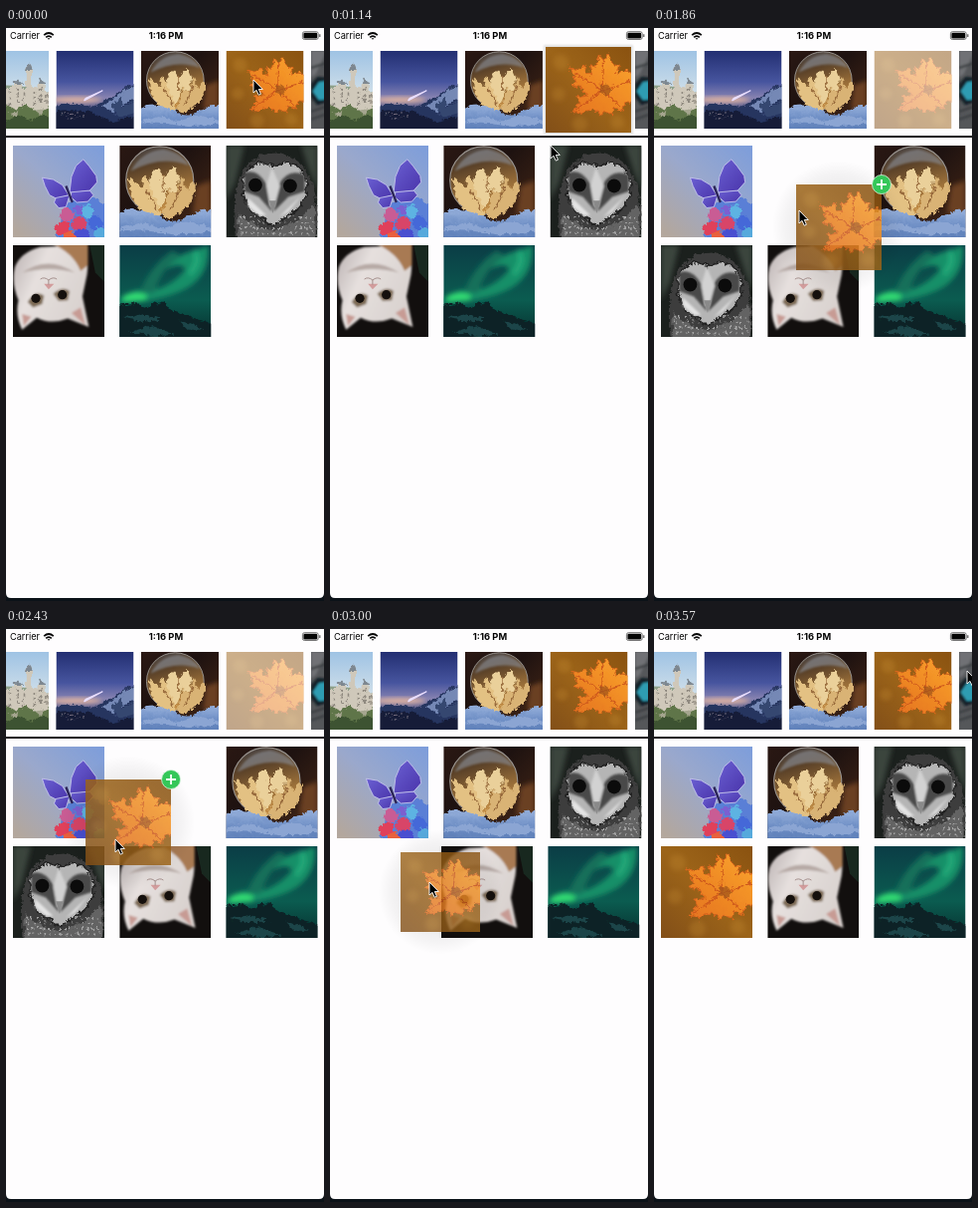
Recreate the animation shown at these times as an HTML page. Size 320 by 575 pixels, loop 3710 ms.

```html
<!DOCTYPE html>
<html lang="en">
<head>
<meta charset="utf-8">
<title>Drag and drop between collections</title>
<style>
  html, body { margin: 0; width: 100%; height: 100%; overflow: hidden; background: #0b1218; }
  svg.stage { display: block; width: 320px; height: 575px; }
  text { font-family: Inter, "Liberation Sans", sans-serif; fill: #050505; }
</style>
</head>
<body>
<svg class="stage" viewBox="0 0 320 575">
  <defs>
    <linearGradient id="haze" x1="1" y1="0" x2=".1" y2="1">
      <stop offset="0" stop-color="#7d9ddb"/><stop offset=".5" stop-color="#9aa8cc"/><stop offset="1" stop-color="#b3a79d"/>
    </linearGradient>
    <linearGradient id="wing" x1="0" y1="0" x2="1" y2="1">
      <stop offset="0" stop-color="#6a5fd2"/><stop offset="1" stop-color="#4a35ab"/>
    </linearGradient>
    <linearGradient id="dusk" x2="1" y2="1">
      <stop offset="0" stop-color="#2a1813"/><stop offset=".4" stop-color="#1e1210"/><stop offset="1" stop-color="#4a2a18"/>
    </linearGradient>
    <linearGradient id="snow" x2="0" y2="1">
      <stop offset="0" stop-color="#93add9"/><stop offset=".4" stop-color="#7090c6"/><stop offset="1" stop-color="#5577b2"/>
    </linearGradient>
    <linearGradient id="glass" x2=".3" y2="1">
      <stop offset="0" stop-color="#4a4a50"/><stop offset=".35" stop-color="#5a4128"/><stop offset="1" stop-color="#c08a43"/>
    </linearGradient>
    <linearGradient id="autumn" x1="1" y1="0" x2="0" y2="1">
      <stop offset="0" stop-color="#8a5210"/><stop offset=".5" stop-color="#9c6419"/><stop offset="1" stop-color="#824f18"/>
    </linearGradient>
    <linearGradient id="maple" x1="1" y1="0" x2=".1" y2="1">
      <stop offset="0" stop-color="#fba72f"/><stop offset=".5" stop-color="#f08c25"/><stop offset="1" stop-color="#e57420"/>
    </linearGradient>
    <linearGradient id="fur" x2="1" y2=".5">
      <stop offset="0" stop-color="#b9b0b0"/><stop offset=".4" stop-color="#e6e0de"/><stop offset="1" stop-color="#d9d2cf"/>
    </linearGradient>
    <linearGradient id="polar" x2="0" y2="1">
      <stop offset="0" stop-color="#0b3d46"/><stop offset=".6" stop-color="#0b5c50"/><stop offset="1" stop-color="#07302f"/>
    </linearGradient>
    <linearGradient id="night" x2="0" y2="1">
      <stop offset="0" stop-color="#232f72"/><stop offset=".4" stop-color="#47559f"/><stop offset=".6" stop-color="#8581b0"/><stop offset="1" stop-color="#141c3a"/>
    </linearGradient>
    <linearGradient id="day" x2="0" y2="1">
      <stop offset="0" stop-color="#9fc3e4"/><stop offset=".6" stop-color="#d5e2ea"/>
    </linearGradient>
    <radialGradient id="shade">
      <stop offset=".5" stop-opacity=".08"/><stop offset=".8" stop-opacity=".04"/><stop offset="1" stop-opacity="0"/>
    </radialGradient>
    <filter id="soft" x="-30%" y="-30%" width="160%" height="160%"><feGaussianBlur stdDeviation="3"/></filter>
    <filter id="faint" x="-20%" y="-20%" width="140%" height="140%"><feGaussianBlur stdDeviation="1.2"/></filter>
    <filter id="rough" x="-10%" y="-10%" width="120%" height="120%">
      <feTurbulence baseFrequency=".12" numOctaves="2" seed="4"/>
      <feDisplacementMap in="SourceGraphic" scale="7" xChannelSelector="R" yChannelSelector="G"/>
    </filter>

    <symbol id="butterfly" viewBox="0 0 100 100">
      <rect width="100" height="100" fill="url(#haze)"/>
      <g filter="url(#rough)">
        <path d="M44 105L50 80 56 62 76 52 92 56 105 70V105Z" fill="#5a7fd6"/>
        <circle cx="57" cy="73" r="8" fill="#c95c94"/><circle cx="53" cy="88" r="8" fill="#e0405a"/>
        <circle cx="60" cy="97" r="7" fill="#e8603c"/><circle cx="70" cy="84" r="8" fill="#d84468"/>
        <circle cx="74" cy="96" r="8" fill="#4a50d0"/><circle cx="80" cy="70" r="7" fill="#5db3e2"/>
        <circle cx="88" cy="82" r="8" fill="#4468d8"/><circle cx="94" cy="95" r="8" fill="#57a9dc"/>
        <circle cx="70" cy="68" r="5" fill="#7b5fd0"/>
      </g>
      <g fill="url(#wing)" stroke="#c3c4ec" stroke-width="1">
        <path d="M61 54L54 43 44 37 32 35 35 44 40 54 48 58Z"/>
        <path d="M62 54L47 57 45 62 50 68 58 67Z"/>
        <path d="M64 50L84 49 88 54 82 61 70 62 63 56Z"/>
        <path d="M62 51L64 34 69 22 77 15 83 22 91 33 92 40 84 49Z"/>
      </g>
      <path d="M58 44L65 62" stroke="#2b2457" stroke-width="2.5"/>
    </symbol>

    <symbol id="bubble" viewBox="0 0 100 100">
      <rect width="100" height="100" fill="url(#dusk)"/>
      <path d="M84 44L100 38V74H80Z" fill="#6b3f20" filter="url(#soft)"/>
      <circle cx="44" cy="38" r="37" fill="url(#glass)" stroke="#99948f" stroke-width="1.2"/>
      <path d="M12 28Q24 6 48 4 70 8 76 22 46 10 12 28Z" fill="#8b9099" opacity=".6" filter="url(#faint)"/>
      <g filter="url(#rough)">
        <path d="M9 34L22 44 25 31 36 46 45 68 40 78Q10 70 9 34Z" fill="#e3c183"/>
        <path d="M45 74L52 48 60 53 66 32 72 46 81 38Q82 68 52 78Z" fill="#d9b374"/>
        <path d="M30 38L40 22 48 32 58 20 64 34 60 52 50 47 44 68Z" fill="#ead09a"/>
        <path d="M27 46L40 70M65 44L54 68M46 30L46 50" stroke="#96683a" stroke-width="2"/>
        <path d="M-5 72Q22 64 40 75T78 73Q92 66 106 71V108H-5Z" fill="url(#snow)"/>
        <path d="M-5 90L20 82 44 88 70 81 105 88V93L60 95 30 91Z" fill="#8ba5d3"/>
      </g>
    </symbol>

    <symbol id="leaf" viewBox="0 0 100 100">
      <rect width="100" height="100" fill="url(#autumn)"/>
      <g fill="#bd842f" opacity=".35" filter="url(#soft)">
        <circle cx="18" cy="18" r="9"/><circle cx="15" cy="55" r="8"/><circle cx="40" cy="90" r="9"/><circle cx="84" cy="88" r="8"/>
      </g>
      <g filter="url(#rough)">
        <path d="M26 22L36 25 43 20 48 28 53 31 50 20 57 21 61 8 66 14 71 6 76 18 84 20 82 30 92 26 103 30V64L92 62 88 72 78 68 76 78 66 74 62 78 54 70 46 72 40 79 36 74 28 74 38 64 34 57 46 55 42 47 30 43 34 36Z" fill="url(#maple)" stroke="#d8651d" stroke-width="1.2"/>
        <path d="M64 49L32 28M64 49L66 12M64 49L100 38M64 49L86 68M64 49L34 72" stroke="#cf5a1c" stroke-width="1.6"/>
        <path d="M62 45L70 41 75 48 69 55 61 52Z" fill="#9c521a" opacity=".7"/>
      </g>
    </symbol>

    <symbol id="owl" viewBox="0 0 100 100">
      <rect width="100" height="100" fill="#1b201d"/>
      <path d="M0 0H20L10 40 0 60ZM82 0H100V50L92 30Z" fill="#3a443c" filter="url(#soft)"/>
      <g filter="url(#rough)">
        <path d="M10 106Q4 62 12 36 24 6 54 6 86 10 94 46 102 74 94 106Z" fill="#3d3d3d"/>
        <path d="M12 72Q30 90 50 90T95 62L96 106H10Z" fill="#636363"/>
        <path d="M12 76H95M14 82H94M12 88H95M14 94H94" stroke="#a6a6a6" stroke-width="2" stroke-dasharray="2 4"/>
        <path d="M50 22Q34 10 21 26 10 50 26 70L49 85 70 72Q92 58 85 32 70 8 50 22Z" fill="#b5b5b5" stroke="#242424" stroke-width="2"/>
      </g>
      <g filter="url(#faint)">
        <path d="M20 30Q34 24 45 44L50 72 36 56 20 50ZM86 32Q68 24 58 42L52 72 68 56 86 50Z" fill="#4a4a4a"/>
        <path d="M50 24L44 44 48 66 53 66 59 44Z" fill="#d2d2d2"/>
        <path d="M24 57L44 76 36 76 24 66ZM82 55L58 78 68 72Z" fill="#e4e4e4"/>
      </g>
      <circle cx="32" cy="43" r="7.5" fill="#0b0b0b"/><circle cx="70" cy="44" r="7.5" fill="#0b0b0b"/>
      <path d="M47 60L55 60 51 74Z" fill="#8a8a8a"/>
    </symbol>

    <symbol id="cat" viewBox="0 0 100 100">
      <rect width="100" height="100" fill="#120f0e"/>
      <path d="M84 0H100V40L90 30Z" fill="#18281f"/>
      <g filter="url(#faint)">
        <path d="M2 24Q8 8 30 2L74 0Q84 12 81 32L76 56 83 89 60 80Q42 87 26 79L10 92Q2 76 6 60-2 42 2 24Z" fill="url(#fur)"/>
        <path d="M42-2H82L82 22 74 28Q66 8 42-2Z" fill="#a87a52"/>
        <path d="M64 74L79 87 74 68ZM10 75L12 88 20 78Z" fill="#c79b94"/>
        <path d="M10 30Q38 10 68 30Q40 22 10 30Z" fill="#b7aaa6"/>
        <path d="M16 62Q24 48 34 55L32 64 22 68ZM44 53Q54 44 62 50L60 60 50 61Z" fill="#7d6a55"/>
      </g>
      <circle cx="25" cy="58" r="5" fill="#15100d"/><circle cx="54" cy="54" r="5" fill="#15100d"/>
      <path d="M34 42H45L39 48Z" fill="#d29c9c"/>
      <path d="M39 43V38Q34 34 30 37M39 38Q44 34 48 37" stroke="#a08a86" fill="none"/>
    </symbol>

    <symbol id="aurora" viewBox="0 0 100 100">
      <rect width="100" height="100" fill="url(#polar)"/>
      <g filter="url(#soft)">
        <path d="M0 58Q22 44 42 48 62 40 72 26 66 18 52 26 60 10 82 6L97 0Q100 28 78 44 54 60 0 64Z" fill="#178f68"/>
        <path d="M22 52Q34 22 58 6L68 12Q46 24 38 52Z" fill="#13705a"/>
        <path d="M84 4Q94 18 78 34L74 30Q84 18 80 6Z" fill="#23a878"/>
        <path d="M4 56Q14 49 30 54L28 60 4 61Z" fill="#30dc72"/>
      </g>
      <g filter="url(#rough)">
        <path d="M-5 64L14 62 28 66 44 60 62 72 82 78 106 86V106H-5Z" fill="#0a2225"/>
        <path d="M2 78L24 73 46 80 28 82ZM8 94L34 86 60 95 40 97ZM62 80L90 90 72 90Z" fill="#1d4548"/>
      </g>
    </symbol>

    <symbol id="castle" viewBox="0 0 100 100">
      <rect width="100" height="100" fill="url(#day)"/>
      <path d="M0 48Q60 38 100 54V100H0Z" fill="#8ea08a"/>
      <g filter="url(#rough)">
        <path d="M40 46H54V40H64V46H69V22L73 14 77 22V44H84V40L88 34 92 40V50H104V74H40Z" fill="#cfc8ba"/>
        <path d="M52 41L59 34 66 41ZM69 23L73 13 77 23ZM83 41L88 33 93 41Z" fill="#7d8790"/>
        <path d="M48 50V68M58 46V66M66 52V68M80 50V68M88 46V66M96 54V68" stroke="#8f897f" stroke-width="2" stroke-dasharray="4 3"/>
        <path d="M-5 76L44 66 56 74 70 68 84 76 106 68V106H-5Z" fill="#5f7448"/>
        <path d="M40 90L58 80 76 88 90 80 106 86V106H40Z" fill="#3c5230"/>
        <path d="M48 78L58 76 56 84ZM80 74L92 72 88 80Z" fill="#a5a58f"/>
      </g>
    </symbol>

    <symbol id="comet" viewBox="0 0 100 100">
      <rect width="100" height="100" fill="url(#night)"/>
      <ellipse cx="25" cy="63" rx="34" ry="4" fill="#d9b0a2" filter="url(#soft)"/>
      <path d="M36 64L60 51 38 61Z" fill="#fff" stroke="#e8ddff" stroke-width="1.5"/>
      <g filter="url(#rough)">
        <path d="M-5 69L26 66 44 70 58 63 74 55 86 46 106 38V106H-5Z" fill="#26345f"/>
        <path d="M58 69L74 58 87 48 104 41V58L86 66 74 80Z" fill="#7488b5"/>
        <path d="M70 68L86 56 82 72 104 60V76L78 84Z" fill="#34466f"/>
        <path d="M-5 76Q34 72 50 80L70 90 106 80V106H-5Z" fill="#121c38"/>
        <path d="M4 80L26 78M12 85L34 83" stroke="#7d7382" stroke-width="1.5" stroke-dasharray="2 3"/>
      </g>
    </symbol>

    <symbol id="eye" viewBox="0 0 100 100">
      <rect width="100" height="100" fill="#55575a"/>
      <g filter="url(#faint)">
        <path d="M0 0H20L6 30 0 34Z" fill="#6f7174"/>
        <path d="M0 42L8 33 20 34V66L8 70 0 60Z" fill="#17242a"/>
        <path d="M2 52L10 40 24 38V62L10 63Z" fill="#2f9cb2"/>
        <path d="M0 78L18 72M0 88L18 82M0 22L18 16" stroke="#3d4043" stroke-width="3"/>
      </g>
    </symbol>
  </defs>

  <rect width="320" height="575" fill="#0b1218"/>
  <path d="M0 0H320V567Q320 572 315 572H5Q0 572 0 567Z" fill="#fefdfe"/>

  <text x="4" y="11.4" font-size="9.2">Carrier</text>
  <text x="161" y="11.4" font-size="9.4" font-weight="700" text-anchor="middle">1:16 PM</text>
  <g fill="none" stroke="#050505" stroke-width="1.7">
    <path d="M38.2 7.2Q43 2.8 47.8 7.2M40.2 9.4Q43 6.9 45.8 9.4"/>
    <path d="M41.6 10.2H44.4L43 11.8Z" fill="#050505" stroke="none"/>
    <rect x="298.4" y="3.7" width="15.8" height="7.8" rx="2" stroke-width=".8" stroke="#555"/>
    <rect x="299.4" y="4.7" width="13.8" height="5.8" rx="1.2" fill="#050505" stroke="none"/>
    <path d="M315.8 6.2V9" stroke-width="1.2" stroke="#555"/>
  </g>

  <g id="strip"></g>
  <rect y="108" width="320" height="2" fill="#151217"/>
  <g id="grid"></g>

  <g id="drag">
    <rect id="glow" fill="#dcdcdc" opacity=".85" filter="url(#faint)"/>
    <circle id="halo" fill="url(#shade)"/>
    <use id="preview" href="#leaf"/>
    <g id="badge">
      <circle r="9.5" fill="#35c759" stroke="#d9f3df" stroke-width=".8"/>
      <path d="M-5 0H5M0-5V5" stroke="#fff" stroke-width="1.8"/>
    </g>
  </g>
  <path id="cursor" d="M0 0V13L3 10.3 5.2 15.2 7.4 14.3 5.3 9.5H9.3Z" fill="#000" stroke="#fff" stroke-width=".9"/>
</svg>

<script>
const LOOP = 3710, FPS = 7, CELL = 92;
const $ = id => document.getElementById(id);
const set = (el, attrs) => { for (const k in attrs) el.setAttribute(k, attrs[k]); };
const move = (el, x, y) => el.setAttribute("transform", `translate(${x} ${y})`);
const show = (el, on) => { el.style.display = on ? "" : "none"; };

function tile(parent, name, attrs) {
  const el = document.createElementNS("http://www.w3.org/2000/svg", "use");
  set(el, { href: "#" + name, ...attrs });
  return parent.appendChild(el);
}

const strip = ["castle", "comet", "bubble", "leaf", "eye"].map((name, i) =>
  tile($("strip"), name, { x: 85.5 * i - 35, y: 23, width: 78, height: 78 }));
const cells = ["butterfly", "bubble", "owl", "cat", "aurora"].map(name =>
  tile($("grid"), name, { width: CELL, height: CELL }));

// time, x, y
const cursorPath = [
  [0, 249, 52], [1000, 249, 52], [1143, 222, 118], [1429, 190, 158], [1857, 146, 183],
  [2143, 126, 184], [2429, 110, 211], [2571, 102, 250], [2714, 100, 254], [3000, 100, 254],
  [3143, 112, 240], [3286, 200, 150], [3429, 292, 62], [3571, 315, 42]
];
// time, x, y, size, opacity
const dragPath = [
  [714, 221.5, 23, 78, 1], [857, 217, 19, 86, 1], [1143, 217, 19, 86, 1], [1286, 196, 74, 86, .85],
  [1571, 170, 148, 86, .85], [1857, 143, 157, 86, .85], [2143, 115, 143, 86, .85], [2429, 80, 151, 86, .85],
  [2571, 70, 214, 86, .85], [2714, 68, 221, 86, .85], [2857, 68, 221, 86, .82], [3000, 71, 224, 80, .8],
  [3143, 34, 220, 87, .92], [3286, 7, 218, CELL, 1]
];
// start, duration, empty slot
const gaps = [[0, 1, 9], [1430, 350, 1], [2490, 220, 9], [2714, 313, 3]];

function sample(path, t) {
  const n = path.findIndex(p => p[0] > t);
  if (n === 0) return path[0].slice(1);
  if (n < 0) return path[path.length - 1].slice(1);
  const a = path[n - 1], b = path[n], k = (t - a[0]) / (b[0] - a[0]);
  return a.slice(1).map((v, i) => v + (b[i + 1] - v) * k);
}

const ease = k => k * k * (3 - 2 * k);

function slot(i, gap) {
  const n = i + (i >= gap);
  return [7 + 107.25 * (n % 3), 118 + 100 * Math.floor(n / 3)];
}

function drawGrid(t) {
  const n = gaps.filter(g => g[0] <= t).length - 1;
  const [start, length, gap] = gaps[n];
  const before = gaps[Math.max(0, n - 1)][2];
  const k = ease(Math.min(1, (t - start) / length));
  cells.forEach((cell, i) => {
    const a = slot(i, before), b = slot(i, gap);
    move(cell, a[0] + (b[0] - a[0]) * k, a[1] + (b[1] - a[1]) * k);
  });
}

function drawDrag(t) {
  const [x, y, size, opacity] = sample(dragPath, t);
  show($("drag"), t > 720);
  set($("preview"), { x, y, width: size, height: size, opacity });
  set($("glow"), { x: x - 2, y: y - 2, width: size + 4, height: size + 4 });
  show($("glow"), t < 1200);
  set($("halo"), { cx: x + size / 2, cy: y + size / 2, r: size * .78 });
  show($("halo"), t > 1200 && t < 3200);
  move($("badge"), x + size, y);
  show($("badge"), t > 1420 && t < 2800);
  set(strip[3], { opacity: t > 1200 && t < 2900 ? .5 : 1 });
}

function frame(now) {
  const t = Math.floor((now % LOOP + 5) * FPS / 1000) * 1000 / FPS;
  drawGrid(t);
  drawDrag(t);
  move($("cursor"), ...sample(cursorPath, t));
  requestAnimationFrame(frame);
}
frame(performance.now());
</script>
</body>
</html>
```
